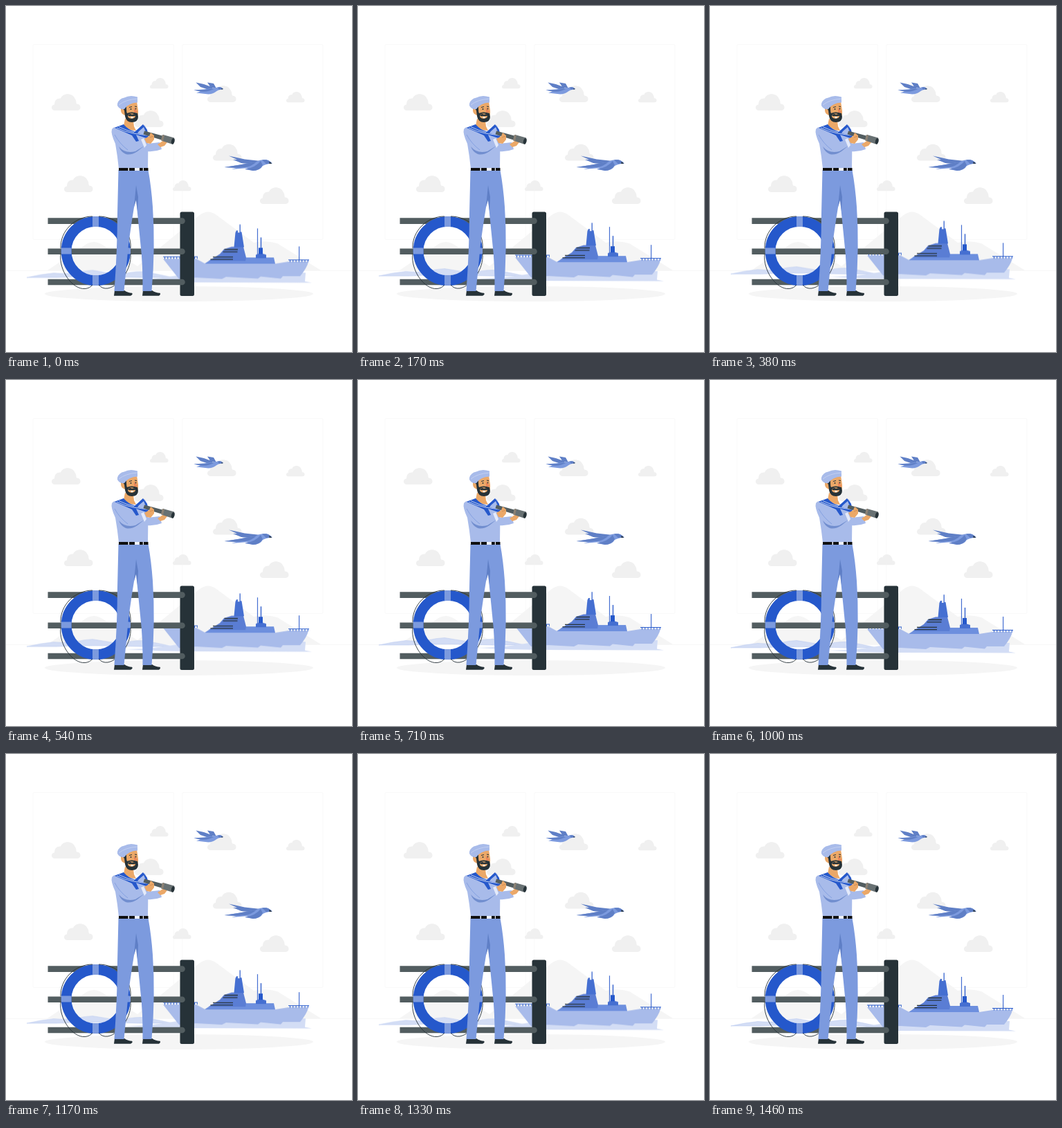
Recreate the animation shown at these times as an HTML page. Size 500 by 500 pixels, loop 1.5 s.

```html
<!DOCTYPE html>
<html lang="en">
<head>
<meta charset="utf-8">
<title>Sailor on deck</title>
<style>
  html, body { margin: 0; width: 100%; height: 100%; overflow: hidden; background: #fff; }
  svg { display: block; width: 100%; height: 100%; }
  .pale { fill: #f5f5f5; }
  .cloud { fill: #f0f0f0; }
  .dark { fill: #263238; }
  .grey { fill: #525d60; }
  .blue { fill: #2558cb; }
  .mid { fill: #7c9ade; }
  .mast { fill: #456fd1; }
  .deck { fill: #6d8fde; }
  .bridge { fill: #5a7dd4; }
  .light { fill: #a8bbea; }
  .foam { fill: #d3ddf5; }
  .skin { fill: #eba868; }
  .shade { fill: #5f7fc6; }
  .line { fill: none; stroke: #263238; }
  .float { animation: float 1.5s linear -41.67ms infinite; }
  @keyframes float { 50% { transform: translateY(-10px); } }
</style>
</head>
<body>
<svg viewBox="0 0 500 500">
  <defs>
    <path id="cloud" d="M5 24C-1.5 24-1.5 16 4 15.5C4 9 8 6 13 6.500C16-2 30-2 33.500 6.500C36 10 35 12 36 14.500C43 14 43.500 24 37 24Z"/>
    <path id="rail" class="grey" d="M60.500 0H254.500a4.300 4.300 0 0 1 0 8.600H60.500Z"/>
  </defs>

  <g fill="none" stroke="#f9f9f9">
    <rect x="39" y="55.500" width="203.500" height="282" rx="2"/>
    <rect x="255" y="55.500" width="203" height="282" rx="2"/>
  </g>
  <path class="pale" d="M60 382L112 347Q125 336 139 345L190 376L280 302Q292 293 304 302L358 342Q375 338 392 343L455 382Z"/>
  <path d="M0 382.500H500" stroke="#ebebeb" stroke-width=".4"/>
  <g class="cloud">
    <use href="#cloud" x="66" y="127"/>
    <use href="#cloud" x="186" y="151"/>
    <use href="#cloud" x="291" y="115"/>
    <use href="#cloud" x="299" y="199.500"/>
    <use href="#cloud" x="84" y="245"/>
    <use href="#cloud" x="367" y="262"/>
    <use href="#cloud" transform="translate(208 104) scale(.64)"/>
    <use href="#cloud" transform="translate(405 124) scale(.64)"/>
    <use href="#cloud" transform="translate(241 252) scale(.64)"/>
  </g>
  <ellipse class="pale" cx="250" cy="416" rx="194" ry="11"/>

  <!-- ship and swell -->
  <g class="float">
    <path class="foam" stroke="#a8bbea" stroke-width=".4" d="M30 393L50 389L69 386.500Q88 388 101 386Q113 383 125 382.500Q141 385 165 389Q180 384 198 384.500Q220 388 239 392.500Q200 394 160 392Q110 391 72 393Z"/>
    <path class="foam" d="M172 397L206 396L275 386H433L432 398.500L442 400.500L272 400Q225 400 172 397Z"/>
    <path class="light" d="M227 366H275L288 373H389L408 370H437Q435 379 425 391L400 391L397 394.500L368 391.500L364 394.500L318 392L312 395L275 393L250 395Z"/>
    <path class="deck" d="M287 373L296 367H345V364H387L389 373Z"/>
    <path class="bridge" d="M293 369L309 359L315 352L326 348.500H343L347 364L346 369Z"/>
    <path class="mast" d="M329.500 349L331.500 328L333 325H335V328H337.500V316.300H338.900V327H340.500L344 349ZM361 365V360L365 358.500V350H367.700V335H369.300V350H371V358.500L376 360V365ZM362.900 322H364.100V360H362.900ZM423 348H424.200V368H423Z"/>
    <path class="blue" d="M365 350H371V359H365Z"/>
    <g stroke="#2558cb" fill="none">
      <path d="M227 363H277M408 367.500H438"/>
      <path d="M229 364.500H277M410 369H437" stroke-width="3" stroke-dasharray="1 3.300"/>
    </g>
    <path class="line" stroke-width="1.300" d="M315.500 352.500H335M313.500 355.800H334.500M299 363.300H328M295.500 366.700H328"/>
  </g>

  <!-- railing and lifebuoy -->
  <rect class="dark" x="251.500" y="297.500" width="20.500" height="121.500" rx="2.500"/>
  <use href="#rail" y="306.300"/>
  <use href="#rail" y="350.500"/>
  <use href="#rail" y="394.700"/>
  <g fill="none" stroke-width="14.800">
    <circle cx="129.800" cy="354" r="42.700" stroke="#2558cb"/>
    <path stroke="#7c9ade" stroke-width="9" d="M129.500 304V319M129.500 389V404M79.800 354H94.500M165 354H180"/>
  </g>
  <path class="line" stroke-width=".9" d="M125 304C99 304 78 326 79 350M79 358C76 382 96 410 114 408.500Q121 408 125 403M134 403Q139 409 147 408C164 405 182 380 180 358M180 350C182 325 160 304 134 304"/>

  <!-- sailor -->
  <g>
    <path class="dark" d="M157 411H171Q177 415 182 414.800Q184 417 180 418.800H156ZM198 411H211Q217 415 222.500 414.800Q224 417 221 418.800H197Z"/>
    <path class="mid" d="M162.500 237H205.500Q210 262 212 290Q216 350 210.500 412H197.500Q198 375 194 340L190 300L188 280L185 291Q181 315 177 345L170.500 412H156.500Q161 350 161 300Z"/>
    <path class="shade" d="M188 259L191 276L190 296L188 280L185 290Z"/>
    <path class="light" d="M158 175L171 171L186 181L200 172Q206 179 205.500 193L205 235H163Q161 216 158 199Q151 184 153 178Q155 175 158 175Z"/>
    <path class="light" d="M204 199L222 197L225 207Q215 211 204 210Z"/>
    <path class="skin" d="M172 163L184 166L185 174L188 180L180 179L170 173Z"/>
    <path class="blue" d="M157 176L170 171Q177 179 186 182L198 171L204 179L206 192L188 186L192 195L188 196L182 187Q169 181 157 176Z"/>
    <path class="light" d="M192 181L199 175L202 182L200 186L190 184Z"/>
    <path d="M160 176Q172 182 184 184L204 187M163 174.500Q174 180 185 182.500" fill="none" stroke="#e6ecfa" stroke-width=".8"/>
    <path class="shade" d="M163 203Q172 214 187 210L200 202L190 210Q181 216 173 214Q166 211 163 203Z" opacity=".75"/>
    <path d="M157 186Q164 199 176 208M196 194L200 203" fill="none" stroke="#7c9ade" stroke-width=".8"/>
    <path d="M195 193L199 191L203 201L200 205Z" fill="#e4eafa"/>
    <!-- belt -->
    <path d="M163 234H205.500V238H163Z" fill="#101010"/>
    <path d="M176.500 234H178V238H176.500ZM186 234H193V238H186ZM197.800 234H199V238H197.800Z" fill="#f2f5fc"/>
    <!-- head -->
    <path class="skin" d="M168 146L175 140L189 138L191 151Q192 165 182 167Q173 168 172 158Q166 156 166 151Q166 147 168 146Z"/>
    <path class="dark" d="M166 149L167 145L174 140L174 149Q174 153 175 155Q181 152 190 155Q193 165 186 167.500Q174 170 172 159L171 151Q169 147 166 149Z"/>
    <ellipse class="skin" cx="181.500" cy="159" rx="5.500" ry="3.800"/>
    <path class="dark" d="M176 158Q179 154.500 182 157Q186 155 189 158Q184 160 181 159Q178 160 176 158Z"/>
    <path d="M179.500 160.500L185 160L182 162.500Z" fill="#fff"/>
    <path d="M185 147L190.500 153.500L185 154Z" fill="#e98558"/>
    <circle class="dark" cx="180.500" cy="149" r="1"/>
    <circle class="dark" cx="187.500" cy="148.500" r=".9"/>
    <path class="line" stroke-width="1" d="M178 146.500L182 145.500M186 145L189 145.500"/>
    <path class="light" d="M161 141Q163 134 171 132.500Q179 128 190 131.500V139.500Q177 140 171 149Q164 150 161 144Z"/>
    <path d="M163 143Q173 135 190 134" fill="none" stroke="#c3d0f1" stroke-width="1"/>
    <!-- spyglass and hands -->
    <path class="skin" d="M219 200L228 194L233 197L229 202L223 204Z"/>
    <path class="grey" d="M200 180.500L226 187.500L224.500 193.500L198.500 185.500Z"/>
    <path d="M227 186L243 190.500Q245 196 241 200L224.500 194.500Z" fill="#687173"/>
    <path d="M226 186L229 187L227 195L224 194Z" fill="#8b8174"/>
    <ellipse class="dark" cx="241.200" cy="195.400" rx="2.200" ry="4.200" transform="rotate(14 241.200 195.400)"/>
    <path class="skin" d="M200 192L207 188L209 183L214 187L214 193L209 199L203 198Z"/>
    <path d="M208 190L213 188" stroke="#c9844b" stroke-width=".7"/>
  </g>

  <!-- birds -->
  <g>
    <path class="shade" d="M274.500 110.500L286 113L297 117L300 121L290 120L281 117ZM291 110.500L300 112L304 119L296 118Z"/>
    <path class="mid" d="M271.500 121.500L285 120.500Q296 119 304 118Q310 115.500 314 120Q306 121 303 124Q297 128.500 288 127L275 125.500L281 123.500Z"/>
    <path class="shade" d="M271.500 121.500L288 121L301 119Q293 125 281 123.500ZM306 118Q311 116 314 120L308 121Z"/>
    <path class="dark" d="M311.500 119L314 120L311.500 120.800Z"/>
    <path class="shade" d="M322 216.500L345 221.500L368 224L360 229L340 227L328 222L334 222Z"/>
    <path class="mid" d="M315.500 233L338 229.500L362 225Q366 222 376 222Q381 223 384.500 227.500Q376 228 371 231Q367 238 357 238L345 236L350 234L326 236L334 233.500Z"/>
    <path class="shade" d="M315.500 233L338 229.500L362 225Q355 232 345 233L330 234ZM346 235.500Q360 234 368 224L371 230Q366 238 357 238ZM370 222.500Q380 221.500 384.500 227.500L376 228Z"/>
    <path class="dark" d="M380.500 225L384.500 227.500L380.500 228Z"/>
  </g>
</svg>
</body>
</html>
```
